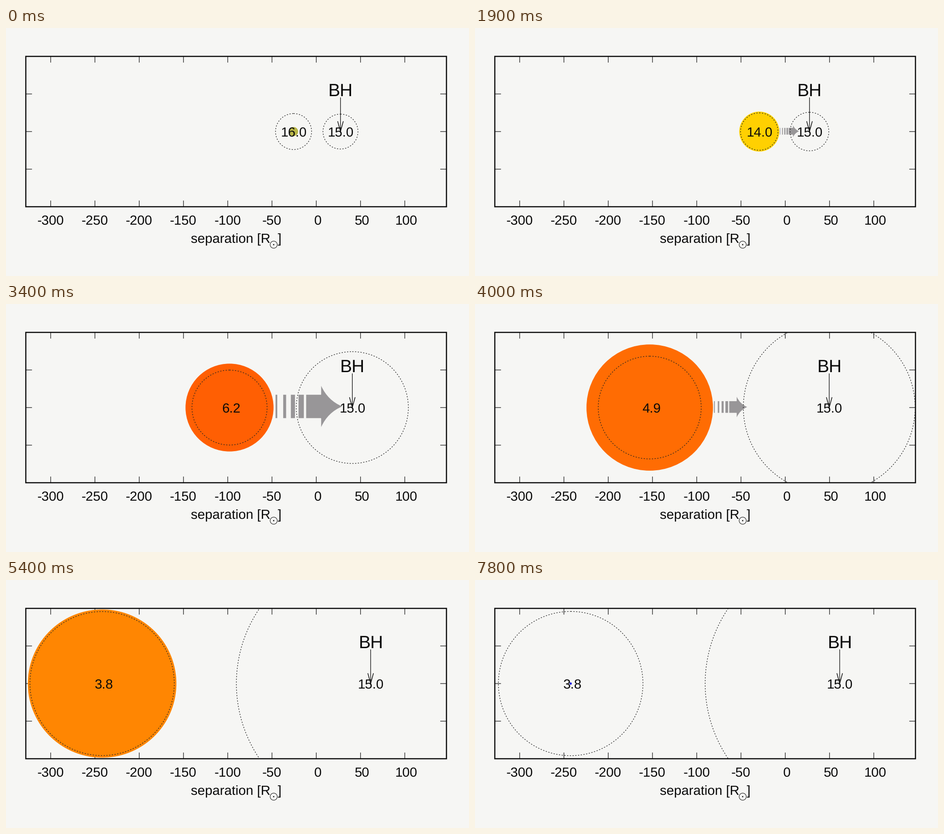
Recreate the animation shown at these times as a matplotlib script. Size 1017 by 546 pixels, loop 8 s.

```python
import numpy as np
import matplotlib.pyplot as plt
from matplotlib.animation import FuncAnimation
from matplotlib.patches import Circle, PathPatch, Rectangle
from matplotlib.path import Path

W, H = 1017, 546
FRAMES, STEP = 80, 100
LEFT, RIGHT, TOP, BOTTOM = 43.5, 967.5, 62.5, 393.5
ZERO, SCALE, MID = 681.5, 1.9445, 228
INK, GREY = "#0a0a0a", "#989698"
M_START, M_END, M_BH, A_START = 16.0, 3.805, 15.0, 53.0
FONT = 29.4

plt.rcParams["font.family"] = "Liberation Sans"
plt.rcParams["text.hinting"] = "none"
plt.rcParams["lines.scale_dashes"] = False


def ease(t, a, b):
    u = np.clip((t - a) / (b - a), 0, 1)
    return u * u * (3 - 2 * u)


# Stellar evolution, time in seconds

def star_mass(t):
    """A slow wind first, then mass transfer that levels off."""
    left = np.exp(-.54 * max(t - 1.4, 0) ** 1.58) * (1 - ease(t, 4.7, 5.5))
    return min(M_START - .35 * t, M_END + (M_START - M_END) * left)


def star_radius(t):
    """Grows to a giant, then collapses to a small hot core."""
    giant = 122 / (1 + np.exp(-2.6 * (t - 3.48)))
    shrink = 3.7 * ease(t, 5.45, 6.3) + .45 * ease(t, 6.3, 7.8)
    return (10 + 32 * ease(t, .2, 1.7) + giant) * np.exp(-shrink)


def star_color(t):
    """Blue at heat 1, yellow at 0, red at -1."""
    heat = (.28 - .91 * ease(t, .4, 3.4) + .16 * ease(t, 3.2, 5.2)
            + 1.34 * ease(t, 5.5, 6.6))
    yellow = np.array([1, .99, 0])
    end = np.array([0, 0, 1]) if heat > 0 else np.array([1, 0, .02])
    return tuple(yellow + (end - yellow) * abs(heat))


def flow_size(t):
    return 160 * np.sin(np.pi * np.clip((t - 1.4) / 3.32, 0, 1)) ** 1.7


def separation(m):
    """Orbit after the lost mass is blown away from the accretor."""
    return (A_START * (M_START / m) ** 2 * (M_START + M_BH) / (m + M_BH)
            * np.exp(2 * (m - M_START) / M_BH))


def roche(q):
    p = q ** (2 / 3)
    return .49 * p / (.6 * p + np.log(1 + q ** (1 / 3)))


def flow_path(x, y, size):
    """Striped arrow with a concave head, starting at x."""
    verts, codes = [], []
    w = .176
    for k in range(5):
        a = .115 * k
        b = a + (.026 + .018 * k if k < 4 else .23)
        verts += [(a, -w), (b, -w), (b, w), (a, w), (a, -w)]
        codes += [Path.MOVETO] + [Path.LINETO] * 3 + [Path.CLOSEPOLY]
    verts += [(.685, -.31), (.785, -.09), (1, 0), (.785, .09), (.685, .31), (.685, -.31)]
    codes += [Path.MOVETO] + [Path.CURVE3] * 4 + [Path.CLOSEPOLY]
    return Path(np.array(verts) * size + (x, y), codes)


# 72 dpi makes one point equal one pixel
fig = plt.figure(figsize=(W / 72, H / 72), dpi=72, facecolor="#f6f6f4")
ax = fig.add_axes([0, 0, 1, 1])
ax.set_xlim(0, W)
ax.set_ylim(H, 0)
ax.axis("off")


def line(xs, ys, width=1.2, z=1):
    return ax.plot(xs, ys, color=INK, lw=width, zorder=z, snap=False)[0]


def text(x, y, s, size=FONT, ha="center"):
    return ax.text(x, y, s, size=size, ha=ha, va="baseline", color=INK, zorder=6)


def disc(x, y, r, **style):
    return ax.add_patch(Circle((x, y), r, **style))


def lobe_circle():
    c = disc(0, 0, 1, fill=False, ec="#222222", lw=1.3, ls=(0, (2.6, 3.4)), zorder=4)
    c.set_clip_path(frame)
    return c


def place(circle, x, r):
    circle.set_center((x, MID))
    circle.set_radius(r)


frame = Rectangle((LEFT, TOP), RIGHT - LEFT, BOTTOM - TOP, fill=False,
                  ec=INK, lw=2.5, zorder=1, snap=False)
ax.add_patch(frame)
for v in range(-300, 101, 50):
    x = ZERO + v * SCALE
    line([x, x], [TOP, TOP + 13])
    line([x, x], [BOTTOM, BOTTOM - 13])
    text(x + (-.3 if v < 0 else 3.4), 432.5, str(v))
for k in (1, 2, 3):
    y = TOP + (BOTTOM - TOP) * k / 4
    line([LEFT, LEFT + 13], [y, y])
    line([RIGHT, RIGHT - 13], [y, y])

text(405.5, 473, "separation [R", ha="left")
text(597, 473, "]", ha="left")
disc(588, 477, 7.8, fill=False, ec=INK, lw=1)
disc(588, 477, 1.4, color=INK, lw=0)

star = disc(0, 0, 1, lw=0, zorder=2)
flow = PathPatch(flow_path(0, 0, 1), fc=GREY, lw=0, zorder=3)
ax.add_patch(flow)
lobe, bh_lobe = lobe_circle(), lobe_circle()
mass_text, bh_mass = text(0, 238.5, ""), text(0, 238.5, f"{M_BH:.1f}")
bh_name = text(0, 150.5, "BH", 39)
pointer, barbs = line([], [], 1.3, z=7), line([], [], 1.5, z=7)


def update(i):
    t = i * STEP / 1000
    m, r, size = star_mass(t), star_radius(t), flow_size(t)
    a = separation(m) * SCALE
    x1 = ZERO - a * M_BH / (m + M_BH)
    x2 = ZERO + a * m / (m + M_BH)

    place(star, x1, r)
    star.set_facecolor(star_color(t))
    place(lobe, x1, a * roche(m / M_BH))
    place(bh_lobe, x2, a * roche(M_BH / m))

    flow.set_visible(size > 1)
    flow.set_path(flow_path(x1 + r + .03 * size, MID - .017 * size, size))

    # the label is padded to four characters, so short ones sit to the right
    label = f"{m:.1f}"
    mass_text.set_text(label)
    mass_text.set_x(x1 + (.5 if len(label) == 4 else 4))
    bh_mass.set_x(x2 + .5)
    bh_name.set_x(x2 + .5)
    pointer.set_data([x2, x2], [153.5, MID])
    barbs.set_data([x2 - 6, x2, x2 + 6], [206, MID, 206])
    return star, flow, lobe, bh_lobe, mass_text, bh_mass, bh_name, pointer, barbs


anim = FuncAnimation(fig, update, frames=FRAMES, interval=STEP,
                     repeat=True, repeat_delay=0, blit=False)
plt.show()
```
